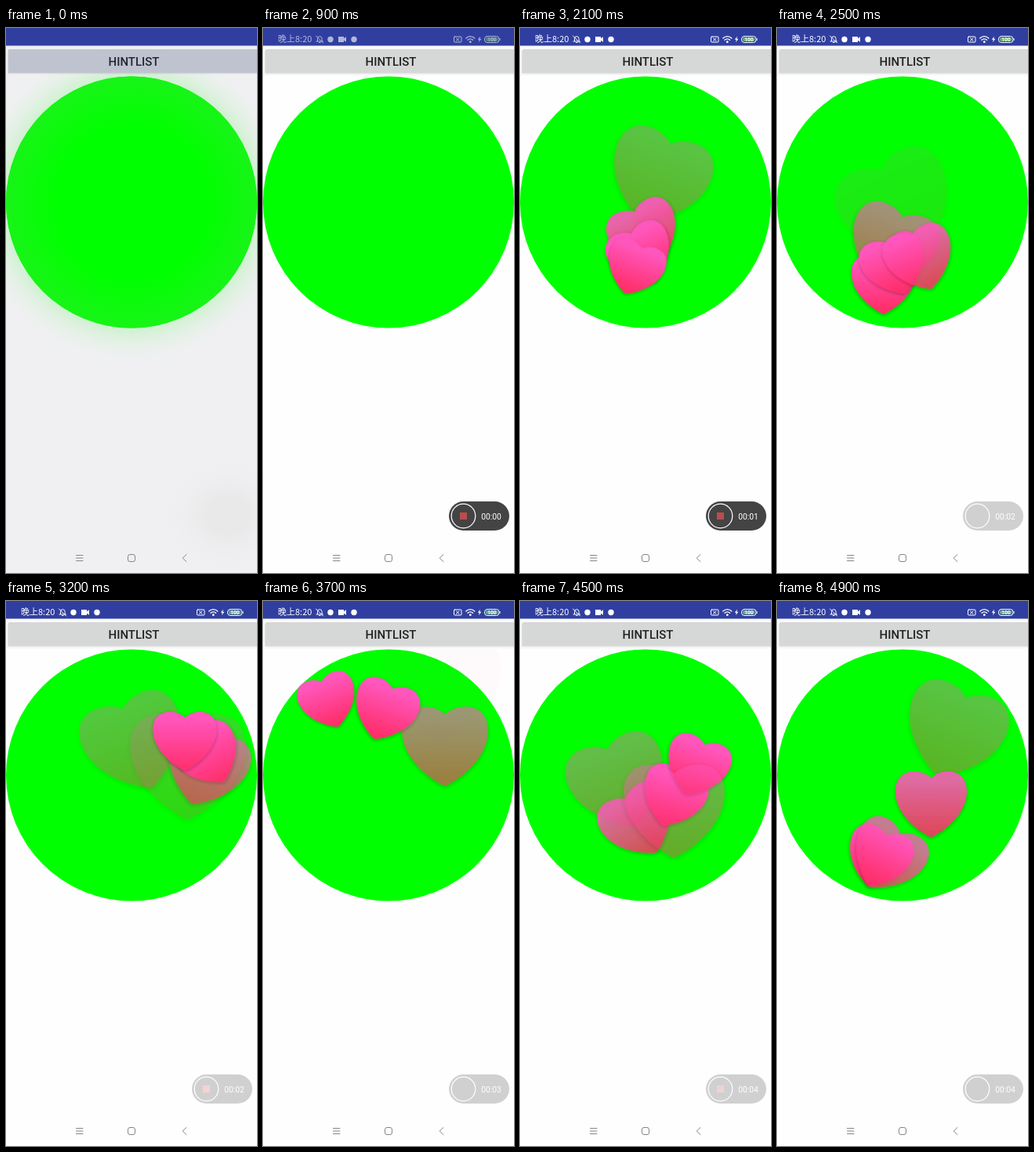
An HTML page for the animation above (5 s loop, 320 by 693 pixels).

```html
<!DOCTYPE html>
<html lang="zh">
<head>
<meta charset="utf-8">
<title>Tap hearts</title>
<style>
  html, body { margin: 0; width: 100%; height: 100%; overflow: hidden; background: #fefefe; }
  svg { display: block; width: 320px; height: 693px; }
  text { font-family: Roboto, sans-serif; }
  .line { fill: none; stroke-linecap: round; stroke-linejoin: round; }
</style>
</head>
<body>
<svg viewBox="0 0 320 693">
  <defs>
    <linearGradient id="pink" x2="0" y2="1">
      <stop offset=".1" stop-color="#ff57be"/>
      <stop offset=".9" stop-color="#ff2f6c"/>
    </linearGradient>
    <radialGradient id="glow">
      <stop offset=".76" stop-color="#c4f2c4" stop-opacity=".8"/>
      <stop offset="1" stop-color="#f0f0f2" stop-opacity="0"/>
    </radialGradient>
    <radialGradient id="rim">
      <stop offset=".6" stop-color="#18f418" stop-opacity="0"/>
      <stop offset="1" stop-color="#18f418"/>
    </radialGradient>
    <radialGradient id="smudge">
      <stop offset=".3" stop-color="#e9e9ea"/>
      <stop offset="1" stop-color="#f0f0f2" stop-opacity="0"/>
    </radialGradient>
    <filter id="shadow" x="-20%" y="-20%" width="140%" height="140%">
      <feDropShadow dx="0" dy="1.5" stdDeviation="2" flood-color="#000" flood-opacity=".35"/>
    </filter>
    <clipPath id="stage"><rect y="62" width="320" height="631"/></clipPath>
    <path id="heart" fill="url(#pink)" filter="url(#shadow)"
      d="M0-30C5-35 12-37.5 20-37.5C33-37.5 41-28 41-15C41 8 21 27 2 37Q0 38-2 37C-21 27-41 8-41-15C-41-28-33-37.5-20-37.5C-12-37.5-5-35 0-30Z"/>
  </defs>

  <rect width="320" height="693" fill="#fefefe"/>
  <rect y="22" width="320" height="39" fill="#f9f9fa"/>
  <g class="haze">
    <rect width="320" height="693" fill="#f0f0f2"/>
    <circle cx="160" cy="221.5" r="208" fill="url(#glow)"/>
    <ellipse cx="283" cy="620" rx="88" ry="75" fill="url(#smudge)"/>
  </g>

  <rect width="320" height="22.5" fill="#303f9f"/>
  <g id="status" fill="#fff" stroke="none">
    <text x="19" y="18" font-size="11" style="font-family:'Noto Sans CJK SC','Noto Sans CJK',sans-serif">晚上8:20</text>
    <g class="line" stroke="#fff">
      <path d="M68 17h8.5M69.500 16.500v-3a2.800 2.800 0 0 1 5.600 0v3M71.500 18.500h1.600M67.500 10l9 9"/>
      <rect x="243.500" y="11" width="9.500" height="7" rx="1"/>
      <path d="M246.500 13l3.500 3.200M250 13l-3.500 3.200"/>
      <path d="M258.800 13a7.500 7.500 0 0 1 11 0M261 15.200a4.600 4.600 0 0 1 6.600 0" stroke-width="1.300"/>
      <rect x="282.500" y="10.500" width="18.500" height="8" rx="3.500"/>
    </g>
    <circle cx="86" cy="14.500" r="3.700"/>
    <path d="M96 11h7v2.300l3-2v6.500l-3-2v2.300h-7z"/>
    <circle cx="116" cy="14.500" r="3.700"/>
    <circle cx="264.300" cy="17.700" r="1.400"/>
    <path d="M277 10.500l-3.200 4.300h2l-.8 3.500 3.400-4.500h-2.200z"/>
    <rect x="284" y="12" width="15.500" height="5" rx="2" fill="#64b07a"/>
    <rect x="301.500" y="13" width="1" height="3"/>
    <text x="291.800" y="17" font-size="6.500" font-weight="700" text-anchor="middle">100</text>
  </g>

  <rect x="2" y="28" width="320" height="30.500" rx="2" fill="#000" opacity=".09"/>
  <rect x="3" y="27" width="320" height="30" rx="1.500" fill="#d6d7d7"/>
  <text x="163" y="48" font-size="15" font-weight="500" text-anchor="middle" fill="#212121">HINTLIST</text>
  <rect class="haze" x="3" y="27" width="317" height="30" fill="#2840a0" fill-opacity=".13"/>

  <circle cx="160" cy="221.500" r="160" fill="#0f0"/>
  <circle class="haze" cx="160" cy="221.500" r="160" fill="url(#rim)"/>
  <g id="hearts" clip-path="url(#stage)"></g>

  <g class="line" stroke="#85858f">
    <path d="M89.500 670.500h8.500M89.500 674h8.500M89.500 677.500h8.500M230 669.500l-4.800 4.500 4.800 4.500"/>
    <rect x="155.500" y="669.500" width="9" height="9" rx="2.500"/>
  </g>

  <g id="recorder">
    <rect x="237" y="602" width="77" height="37" rx="18.500" fill="#444"/>
    <circle cx="255.500" cy="620.500" r="15.300" fill="none" stroke="#fff" stroke-width="1.200"/>
    <rect id="stop" x="251" y="616" width="9" height="9" fill="#e2504f"/>
    <text id="clock" x="291" y="624.500" font-size="10.300" text-anchor="middle" fill="#fff"></text>
  </g>
</svg>

<script>
const LOOP = 5000;
const $ = id => document.getElementById(id);
const clamp = v => Math.min(1, Math.max(0, v));

// Each tap: time, centre x, centre y, tilt
const taps = [
  [1505, 176, 235, 20], [1670, 160, 270, -25], [1830, 155, 289, -25],
  [1978, 146, 306, 20], [2130, 136, 326, 0], [2275, 150, 302, -20],
  [2415, 183, 294, -20], [2597, 165, 227, -20], [2697, 254, 235, 20],
  [2850, 259, 197, -30], [3005, 228, 178, 0], [3181, 232, 211, 0],
  [3370, 155, 140, 20], [3560, 84, 128, -20], [3730, 89, 211, 20],
  [3915, 127, 273, -20], [4046, 152, 294, -30], [4175, 195, 250, 20],
  [4304, 225, 211, 20], [4461, 196.5, 267, 0], [4630, 129, 327, 20],
  [4823, 140, 326, 30]
].map(([start, x, y, tilt]) => {
  const node = document.createElementNS("http://www.w3.org/2000/svg", "use");
  node.setAttribute("href", "#heart");
  $("hearts").append(node);
  return { start, x, y, tilt, node };
});

// Pop in, settle, then rise while growing and fading
function drawHeart({ start, x, y, tilt, node }, time) {
  const age = time - start;
  const visible = age > 0 && age < 700;
  node.style.display = visible ? "" : "none";
  if (!visible) return;
  const leaving = Math.max(0, age - 400);
  const scale = age < 100 ? 2 - 1.1 * age / 100
    : 0.9 + 0.1 * clamp((age - 150) / 50) + leaving / 350;
  const alpha = age < 100 ? age / 100 : 1 - leaving / 300;
  node.setAttribute("opacity", alpha);
  node.setAttribute("transform",
    `translate(${x} ${y - leaving * 2 / 9}) rotate(${tilt}) scale(${scale})`);
}

function tick(ms) {
  const t = Math.floor(ms / 100) * 100;
  if (t < 500) return 0;
  if (t >= 1100 && t < 1300) return 1100;
  if (t >= 1300 && t < 1600) return 1300;
  return t;
}

function draw(now) {
  const t = tick(now % LOOP);
  const shown = clamp((t - 400) / 500);
  document.querySelectorAll(".haze").forEach(el => el.style.opacity = 1 - shown);
  $("status").style.opacity = clamp((t - 400) / 800);
  $("recorder").style.opacity = shown * (1 - 0.76 * clamp((t - 2100) / 300));
  $("stop").style.opacity = (1 - Math.cos((t - 2500) / 1200 * 2 * Math.PI)) / 2;
  $("clock").textContent = "00:0" + Math.max(0, Math.floor((t - 300) / 1000));
  taps.forEach(tap => drawHeart(tap, t));
}

const begin = performance.now();
function loop() {
  draw(performance.now() - begin);
  requestAnimationFrame(loop);
}
loop();
</script>
</body>
</html>
```
